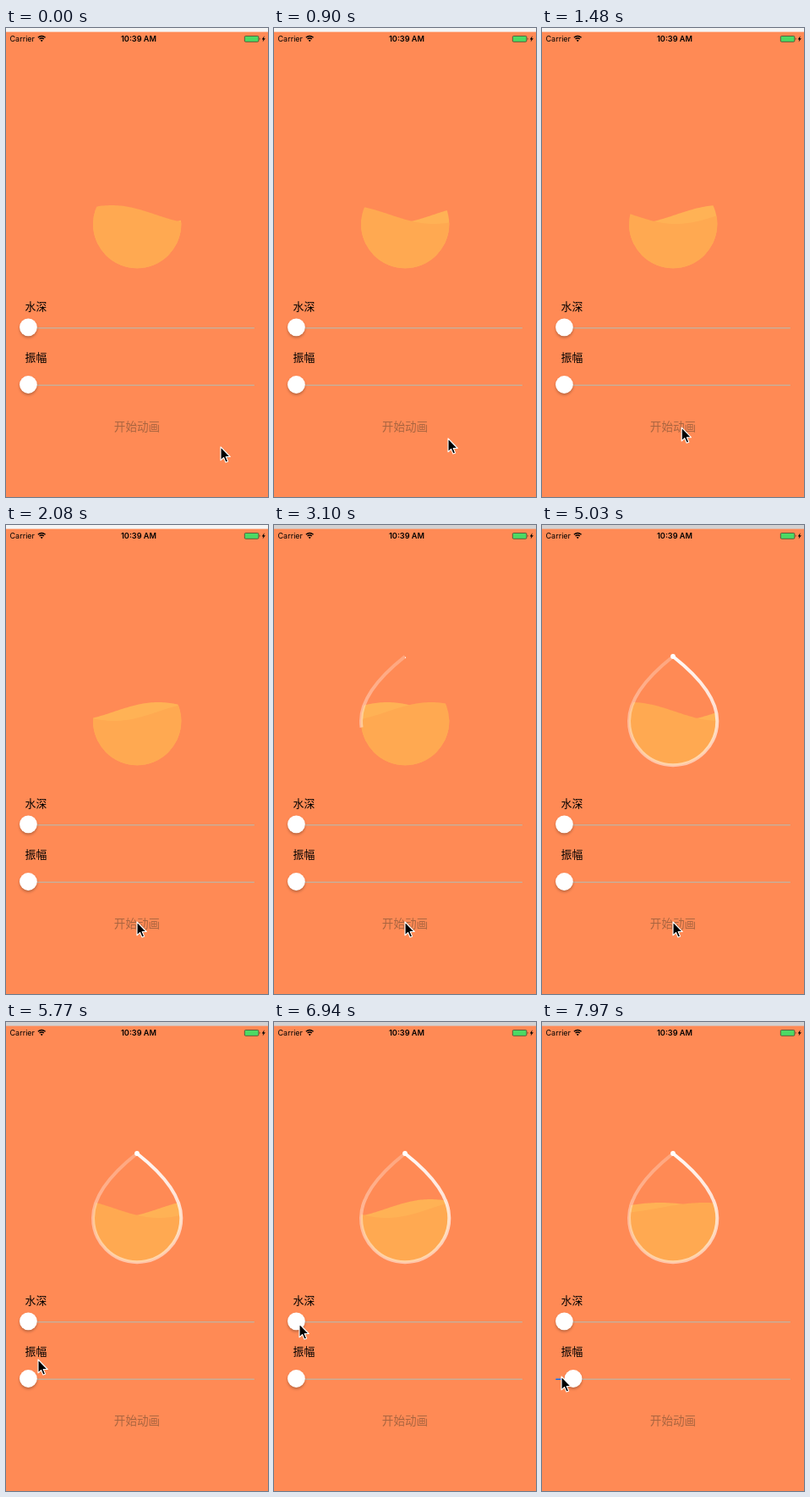
An HTML page that plays this animation: 310x553 px, repeating every 8 s.

```html
<!DOCTYPE html>
<html lang="zh">
<head>
<meta charset="utf-8">
<title>Water drop</title>
<style>
  html, body { margin: 0; width: 100%; height: 100%; overflow: hidden; background: #ff8a55; }
  svg { display: block; width: 310px; height: 553px; }
  .bar { font: 9px Inter, "Open Sans", sans-serif; }
  .cjk { font: 12.8px "Noto Sans CJK SC", "Noto Sans CJK", "Noto Sans CJK JP", sans-serif; }
  .thumb { fill: #fff; filter: drop-shadow(0 2px 1.5px rgba(0, 0, 0, .25)); }
  .track { fill: #c9ae98; }
</style>
</head>
<body>
<svg viewBox="0 0 310 553">
  <defs>
    <path id="drop" pathLength="1" d="M155 155Q103 196 103 231A52 52 0 0 0 207.300 231Q207.300 196 155 155"/>
    <clipPath id="inside"><use href="#drop"/></clipPath>
    <clipPath id="leftHalf"><path d="M90 140H155V300H90Z"/></clipPath>
    <clipPath id="rightHalf"><path d="M155 140H220V300H155Z"/></clipPath>
    <linearGradient id="leftFade" gradientUnits="userSpaceOnUse" x1="0" y1="155" x2="0" y2="283">
      <stop offset="0" stop-color="#fff" stop-opacity=".24"/>
      <stop offset="1" stop-color="#fff" stop-opacity=".5"/>
    </linearGradient>
    <linearGradient id="rightFade" gradientUnits="userSpaceOnUse" x1="0" y1="155" x2="0" y2="283">
      <stop offset="0" stop-color="#fff" stop-opacity=".95"/>
      <stop offset="1" stop-color="#fff" stop-opacity=".5"/>
    </linearGradient>
  </defs>

  <rect width="310" height="553" fill="#ff8a55"/>
  <rect id="strip" width="310" height="4.600"/>

  <g class="bar">
    <text x="4.500" y="16">Carrier</text>
    <text x="157" y="16" text-anchor="middle" font-weight="600" font-size="9.200">10:39 AM</text>
  </g>
  <g fill="none" stroke="#000" stroke-width="1.300">
    <path d="M37.800 11.300Q42.200 7.700 46.600 11.300M39.500 13.100Q42.200 10.900 44.900 13.100"/>
    <path d="M42.200 16.200L40.700 14.600Q42.200 13.400 43.700 14.600Z" fill="#000" stroke="none"/>
  </g>
  <rect x="282.300" y="9.500" width="16.600" height="6.800" rx="1.200" fill="#4cd964" stroke="#3c3a2c" stroke-width=".7"/>
  <path d="M299.900 11.600q1.100 1.300 0 2.600z"/>
  <path d="M305.700 9.200L302.700 13.400H304.500L303.600 16.600L306.900 12.200H305z"/>

  <g clip-path="url(#inside)">
    <path id="back" fill="#ffb255"/>
    <path id="front" fill="#ffa951"/>
  </g>
  <g id="outline" fill="none" stroke-width="4">
    <g clip-path="url(#leftHalf)"><use href="#drop" stroke="url(#leftFade)"/></g>
    <g clip-path="url(#rightHalf)"><use href="#drop" stroke="url(#rightFade)"/></g>
  </g>
  <circle id="tip" cx="155" cy="155" r="2.900" fill="#fff"/>

  <g class="cjk">
    <text x="22.600" y="332.600">水深</text>
    <text x="22.600" y="392.600">振幅</text>
    <text x="155" y="475" text-anchor="middle" font-size="13.600" fill="#a96540">开始动画</text>
  </g>

  <rect class="track" x="16" y="353" width="278" height="1.600" rx=".8"/>
  <circle class="thumb" cx="26.400" cy="352.800" r="10.400"/>
  <rect class="track" x="16" y="420.400" width="278" height="1.600" rx=".8"/>
  <rect id="filled" x="16" y="420.400" height="1.600" rx=".8" fill="#1467e8"/>
  <circle id="thumb" class="thumb" cy="420.500" r="10.400"/>

  <path id="cursor" d="M0 0V15.800L3.600 12.500L6 18.100L8.600 17L6.200 11.500H11.200Z" stroke="#fff" stroke-width="1.100" stroke-linejoin="round"/>
</svg>
<script>
const LOOP = 8000, STEP = 147.6;
const MID = 220, AMP = 11, WAVELENGTH = 208;

// Keyframes: [step, value, ...]
const crestKeys = [[0, 125], [1, 118], [6, 85], [14, 24], [28, -68], [39, -131], [47, -179], [54, -224]];
const drawKeys = [[16, 0], [19, .176], [28, .69], [33.4, 1]];
const dragKeys = [[51, 0], [54, 1]];
const cursorKeys = [
  [3, 254, 494], [6, 206, 484], [11, 155, 468], [35, 155, 468], [39, 38, 398],
  [43, 33, 372], [47, 30, 356], [48, 30, 356], [50, 24, 440], [51, 23, 424], [52, 23, 418]
];

const el = id => document.getElementById(id);
const set = (id, name, value) => el(id).setAttribute(name, value);

function sample(keys, s, col = 1) {
  const i = keys.findIndex(k => k[0] > s);
  if (i < 0) return keys[keys.length - 1][col];
  if (i === 0) return keys[0][col];
  const a = keys[i - 1], b = keys[i];
  return a[col] + (b[col] - a[col]) * (s - a[0]) / (b[0] - a[0]);
}

function wave(crest, mid, amp) {
  let d = "M100 290";
  for (let x = 100; x <= 210; x += 2) {
    const y = mid - amp * Math.cos((x - crest) / WAVELENGTH * 2 * Math.PI);
    d += `L${x} ${y.toFixed(2)}`;
  }
  return d + "V290Z";
}

function render(time) {
  let s = Math.floor(time / STEP);
  if (s < 4) s = Math.min(s, 1);

  const drag = sample(dragKeys, s);
  const crest = sample(crestKeys, s);
  const mid = MID - drag, amp = AMP - 5 * drag;
  set("front", "d", wave(crest, mid, amp));
  set("back", "d", wave(crest - WAVELENGTH / 4, mid, amp));

  const drawn = sample(drawKeys, s);
  set("outline", "visibility", drawn > 0 ? "visible" : "hidden");
  set("outline", "stroke-dasharray", drawn < 1 ? `${drawn} 2` : "none");
  set("tip", "visibility", drawn < 1 ? "hidden" : "visible");

  set("strip", "fill", s < 15 ? "#f5f5f5" : "#d2d1d2");
  set("thumb", "cx", 26.4 + 10.6 * drag);
  set("filled", "width", 10.6 * drag);
  set("cursor", "transform", `translate(${sample(cursorKeys, s)} ${sample(cursorKeys, s, 2)})`);
}

const start = performance.now();
function tick() {
  render((performance.now() - start) % LOOP);
  requestAnimationFrame(tick);
}
tick();
</script>
</body>
</html>
```
